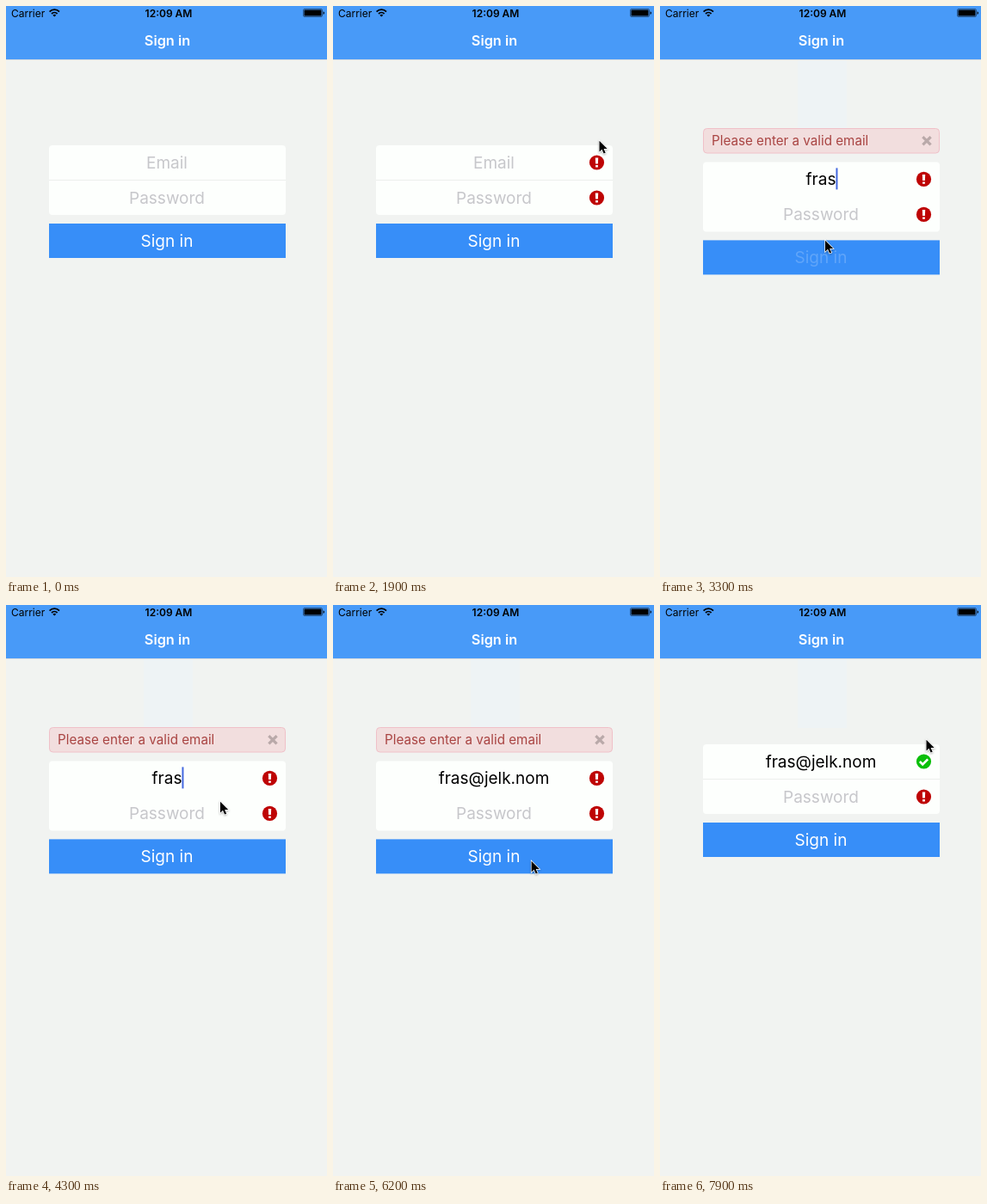
Animation, 373 px wide and 664 px high, one loop 8000 ms. Source, as an HTML page:

```html
<!DOCTYPE html>
<html lang="en">
<head>
<meta charset="utf-8">
<title>Sign in form</title>
<style>
  html, body { margin: 0; width: 100%; height: 100%; overflow: hidden; background: #f1f3f1; }
  svg { display: block; width: 100vw; height: 100vh; }
  text { font-family: Inter, Roboto, sans-serif; white-space: pre; }
  .mid { text-anchor: middle; }
  .field { font-size: 19px; }
  .hint { fill: #c7c7cb; }
  .status { font-size: 12px; }
</style>
</head>
<body>
<svg viewBox="0 0 373 664">
  <defs>
    <g id="error">
      <circle r="8.6" fill="#be0404"/>
      <path d="M-1.7-5.5h3.4l-.3 7h-2.8zM-1.4 3.1h2.8v2.3h-2.8z" fill="#fff"/>
    </g>
    <g id="valid">
      <circle r="8.6" fill="#0abf0a"/>
      <path d="M-4.6 0L-1.3 3.3L4.7-2.7" fill="none" stroke="#fff" stroke-width="2.6"/>
    </g>
  </defs>

  <rect width="373" height="664" fill="#f1f3f1"/>
  <rect id="strip" x="160" y="62" width="57" height="81" fill="#eef3f5"/>

  <rect width="373" height="62" fill="#489af8"/>
  <rect y="62" width="373" height="1" fill="#d3dae0"/>
  <text class="status" x="6" y="12.6">Carrier</text>
  <g fill="none" stroke="#000" stroke-width="1.8">
    <path d="M50.6 6.6a8 8 0 0 1 11.4 0M53 9a4.7 4.7 0 0 1 6.6 0"/>
    <path d="M56.3 12.6l-1.9-1.9a2.7 2.7 0 0 1 3.8 0z" fill="#000" stroke="none"/>
  </g>
  <text class="status mid" x="189" y="12.6" font-weight="600">12:09 AM</text>
  <rect x="345.5" y="3.5" width="22" height="9" rx="1.5" fill="none" stroke="#000" stroke-opacity=".45"/>
  <rect x="346.5" y="4.5" width="20" height="7" rx=".6"/>
  <path d="M368.6 6.2a2 2 0 0 1 0 3.8z"/>
  <text class="mid" x="187.5" y="46" font-size="16.3" font-weight="600" fill="#fff">Sign in</text>

  <g id="alert">
    <rect x="50.5" y="142.5" width="274" height="28.5" rx="4" fill="#f2dede" stroke="#f0c0c8"/>
    <text id="message" x="60" y="162" font-size="15.2" fill="#a94442"></text>
    <path d="M306.5 153.3l7 7m0-7l-7 7" stroke="#b9a9a9" stroke-width="3.2" stroke-linecap="square"/>
  </g>

  <g id="form">
    <rect x="50" y="162" width="275" height="81" rx="4" fill="#fdfffd"/>
    <rect id="divider" x="50" y="202" width="275" height="1" fill="#ecefec"/>
    <text id="hint" class="field mid hint" x="187" y="189">Email</text>
    <text id="email" class="field mid" x="187" y="189"></text>
    <rect id="caret" y="169" width="2" height="25" fill="#4468e0"/>
    <text class="field mid hint" x="187" y="230">Password</text>
    <g id="icons">
      <use id="emailIcon" x="306.5" y="182"/>
      <use href="#error" x="306.5" y="223"/>
    </g>
    <rect x="50" y="253" width="275" height="40" fill="#378ef8"/>
    <text id="button" class="field mid" x="187" y="280" fill="#fff">Sign in</text>
  </g>

  <g id="pointer" style="filter:drop-shadow(0 1px 1px rgba(0,0,0,.3))">
    <path d="M0 .8V13.6L3 10.8L5.1 15.6L7.2 14.7L5.1 10H9.2Z" stroke="#fff" stroke-width="1.4" paint-order="stroke"/>
  </g>
</svg>
<script>
const LOOP = 8000, STEP = 100, TRAVEL = 400;
const ADDRESS = 'fras@jelk.nom';
const FOCUS = 2300;
const ENTRY = [345, 430], CLOSE = [309.5, 156];

const moves = [
  { at: 200, to: [204, 260] },
  { at: 1400, to: CLOSE },
  { at: 1900, to: [219.5, 191] },
  { at: 2700, to: [192, 272] },
  { at: 3900, to: [249, 228] },
  { at: 5800, to: [230.6, 297] },
  { at: 7000, to: CLOSE }
];
const alerts = [
  { from: 800, to: 1900, text: 'Please enter a email' },
  { from: 3300, to: 6400, text: 'Please enter a valid email' },
  { from: 6400, to: 7800, text: 'Please enter a password' }
];
// one key per step within each burst
const bursts = [{ at: 2400, keys: 4 }, { at: 4600, keys: 1 }, { at: 4800, keys: 8 }];

const el = id => document.getElementById(id);
const show = (id, on) => { el(id).style.display = on ? '' : 'none'; };
const clamp = (v, lo, hi) => Math.min(hi, Math.max(lo, v));
const ease = u => u * u * (3 - 2 * u);
const progress = (t, start, length) => ease(clamp((t - start) / length, 0, 1));

const pointerAt = t => moves.reduce((pos, { at, to }) => {
  const u = progress(t, at, TRAVEL);
  return pos.map((p, i) => p + (to[i] - p) * u);
}, ENTRY);

const keysTyped = t => bursts.reduce(
  (sum, { at, keys }) => sum + clamp(Math.floor((t - at) / STEP) + 1, 0, keys), 0);

// the caret stays lit after a key, otherwise it blinks once a second
function caretOn(t) {
  const justTyped = keysTyped(t) > keysTyped(t - 600);
  return t >= FOCUS && (justTyped || (t + 300) % 1000 >= 550);
}

// the label dims on press, then fades back once the alert is up
function labelOpacity(t) {
  const last = alerts.findLast(a => t >= a.from - STEP);
  return last ? 0.2 + 0.8 * progress(t, last.from, 400) : 1;
}

function draw(t) {
  const alert = alerts.find(a => t >= a.from && t < a.to);
  show('alert', alert);
  show('divider', !alert);
  if (alert) el('message').textContent = alert.text;
  el('form').setAttribute('transform', `translate(0 ${alert ? 19.4 : 0})`);

  const typed = keysTyped(t), email = el('email');
  email.textContent = ADDRESS.slice(0, typed);
  show('hint', !typed);
  show('caret', caretOn(t));
  el('caret').setAttribute('x', 187 + (typed ? email.getComputedTextLength() / 2 : 0));

  show('icons', t >= alerts[0].from);
  el('emailIcon').setAttribute('href', t < alerts[2].from ? '#error' : '#valid');
  show('strip', t >= FOCUS);
  el('button').setAttribute('opacity', labelOpacity(t));

  show('pointer', t >= STEP);
  el('pointer').setAttribute('transform', `translate(${pointerAt(t)})`);
}

const start = performance.now();
function tick(now) {
  const t = Math.max(0, now - start) % LOOP;
  draw(Math.floor(t / STEP) * STEP);
  requestAnimationFrame(tick);
}
draw(0);
requestAnimationFrame(tick);
</script>
</body>
</html>
```
